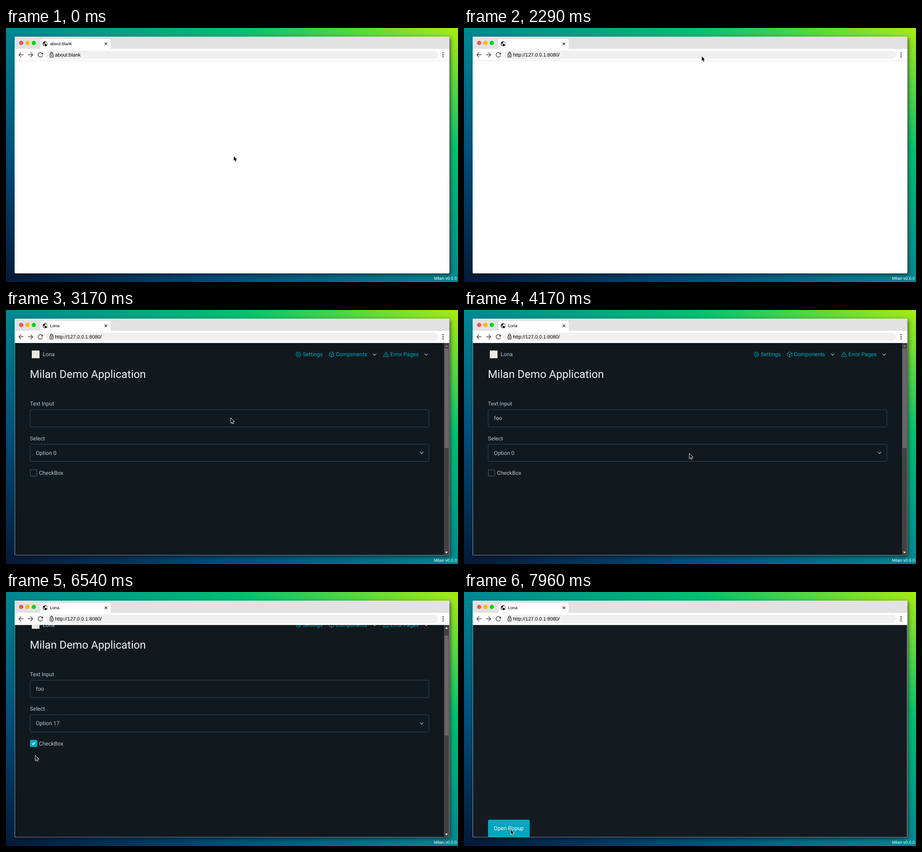
Write an HTML page that moves like this. It is 998x561 px and loops after 8000 ms.

```html
<!DOCTYPE html>
<html lang="en">
<head>
<meta charset="utf-8">
<title>Browser demo</title>
<style>
  html, body { margin: 0; width: 100%; height: 100%; overflow: hidden; }
  body {
    position: relative;
    background: linear-gradient(to right top, #051937, #004d7a, #008793, #00bf72, #a8eb12);
  }
  #window {
    position: absolute; left: 19px; top: 19px; width: 960px; height: 523px;
    border-radius: 2px; background: #fff;
    box-shadow: 2px 3px 9px rgba(0, 0, 0, .6);
  }
  svg { position: absolute; left: 0; top: 0; display: block; }
  text { white-space: pre; text-rendering: geometricPrecision; }
  .ui { font-family: "Liberation Sans", Arial, sans-serif; }
  .page { font: 12.1px Roboto, sans-serif; fill: #bbc6ce; }
  .link { fill: #00acc1; }
  .icon { fill: none; stroke: #00acc1; stroke-linecap: round; stroke-linejoin: round; }
  .chevron { fill: none; stroke: #a8b3bb; stroke-width: 1.3; stroke-linecap: round; stroke-linejoin: round; }
  .field { fill: #11191f; stroke: #374956; }
</style>
</head>
<body>
<div id="window"></div>
<svg width="998" height="561" viewBox="0 0 998 561">
  <defs>
    <clipPath id="view"><rect x="19.6" y="73" width="958.8" height="468.6"/></clipPath>
    <path id="chev" class="chevron" d="M-3.3-1.7 0 1.7 3.3-1.7"/>
    <path id="arrow" d="M8-1H-4.17L1.42-6.59 0-8-8 0 0 8 1.41 6.59-4.17 1H8z"/>
  </defs>

  <path d="M19 46V21q0-2 2-2H977q2 0 2 2V46z" fill="#e2e2e2"/>
  <path d="M76 46V27q0-3 3-3H228q3 0 3 3V46z" fill="#fff"/>
  <circle cx="33.4" cy="33" r="4.7" fill="#ee5a4e"/>
  <circle cx="47.4" cy="33" r="4.7" fill="#f3bc0a"/>
  <circle cx="61.4" cy="33" r="4.7" fill="#0ad416"/>
  <circle cx="86.5" cy="34.7" r="5.3"/>
  <path d="M82.2 33.4l2.8 2.6v1l1 1v1.2q-3.6-.8-3.8-5.800zM87.600 30.400q0 1.800-2 1.800v1.500h-1v1.200h3q1 0 1 1.400h1q.7 0 .9.800 3.200-4.600-2.900-6.700z" fill="#fff"/>
  <path d="M217.900 32.200l5.400 5.400m0-5.400l-5.400 5.400" stroke="#222" stroke-width="1.300"/>
  <text id="title" class="ui" x="97.200" y="38" font-size="9.360"></text>

  <rect x="88" y="50" width="866" height="18.500" rx="9.250" fill="#f0f0f0"/>
  <rect x="19" y="72" width="960" height="1" fill="#e2e2e2"/>
  <g fill="#4a4a4a">
    <use href="#arrow" transform="translate(33 59.200) scale(.71)"/>
    <use href="#arrow" transform="translate(54.500 59.200) scale(-.71 .71)"/>
    <path transform="translate(67.400 50.600) scale(.715)" d="M17.650 6.350C16.200 4.900 14.210 4 12 4c-4.420 0-7.990 3.580-7.990 8s3.570 8 7.990 8c3.730 0 6.840-2.550 7.730-6h-2.080c-.82 2.330-3.040 4-5.650 4-3.310 0-6-2.690-6-6s2.690-6 6-6c1.660 0 3.140.69 4.220 1.780L13 11h7V4l-2.350 2.350z"/>
    <circle cx="965" cy="54.700" r="1.450"/><circle cx="965" cy="59.200" r="1.450"/><circle cx="965" cy="63.700" r="1.450"/>
  </g>
  <g fill="none" stroke="#222" stroke-width="1.150">
    <rect x="97.100" y="57.200" width="7" height="6.900" rx=".8"/>
    <path d="M98.500 57V55.500a2.100 2.100 0 0 1 4.200 0V57"/>
  </g>
  <circle cx="100.600" cy="60.700" r="1.100"/>
  <text id="url" class="ui" x="108.300" y="63" font-size="10.920"></text>

  <g id="page" clip-path="url(#view)">
    <rect id="back" x="19" y="73" width="960" height="469"/>
    <g id="content" class="page">
      <rect x="57" y="89.500" width="17" height="17" fill="#ece8e0"/>
      <text x="81" y="102.200">Lona</text>
      <g id="bareNav" class="link">
        <text x="680.300" y="102.200">Settings</text>
        <text x="741" y="102.200">Components</text>
        <use href="#chev" x="826.300" y="98.300"/>
      </g>
      <text class="link" x="848.600" y="102.200">Error Pages</text>
      <use href="#chev" x="927.700" y="98.300"/>
      <g id="body">
        <g class="link">
          <text x="655.200" y="102.200">Settings</text>
          <text x="728.300" y="102.200">Components</text>
        </g>
        <use href="#chev" x="814" y="98.300"/>
        <g class="icon">
          <path id="gear"/>
          <circle cx="645.500" cy="98.200" r="1.800"/>
          <path d="M719 92.700l5 2.800v5.600l-5 2.800-5-2.800v-5.600zM714.200 95.600l4.800 2.700 4.800-2.700M719 98.300v5.400"/>
          <path d="M839 93l5.700 9.900h-11.400zM839 96.600v2.600M839 101v.2"/>
        </g>
        <text x="52.800" y="150.200" font-size="24.150" fill="#edf0f3">Milan Demo Application</text>
        <text x="52.800" y="211.400">Text Input</text>
        <rect class="field" x="53.300" y="220.200" width="880.400" height="38.200" rx="2.800"/>
        <text id="typed" x="66" y="243.400"></text>
        <text x="52.800" y="287.500">Select</text>
        <rect class="field" x="53.300" y="296.300" width="880.400" height="38.200" rx="2.800"/>
        <text id="option" x="66" y="319.600"></text>
        <use href="#chev" x="917.600" y="315.600"/>
        <rect class="field" x="53.700" y="352.700" width="14.200" height="14.200" rx="2.500" stroke-width="1.600"/>
        <g id="checked">
          <rect x="53" y="352" width="15.600" height="15.600" rx="3" fill="#00acc1"/>
          <path d="M57.600 360l2.200 2.200 4.300-4.500" fill="none" stroke="#fff" stroke-width="1.700"/>
        </g>
        <text x="72.800" y="364">CheckBox</text>
        <rect x="53" y="922.800" width="92" height="38.600" rx="3" fill="#00a6bd"/>
        <text x="66" y="946.200" fill="#fff">Open Popup</text>
      </g>
    </g>
    <g id="scrollbar">
      <rect x="967" y="73" width="12" height="469" fill="#424242"/>
      <rect id="thumb" x="968" width="9.200" fill="#686868"/>
      <path id="up" d="M969.400 81.300h6.400l-3.200-3.600z"/>
      <path d="M969.400 533.700h6.400l-3.200 3.600z" fill="#fff"/>
    </g>
  </g>

  <text class="ui" x="945" y="556.300" font-size="9.360" fill="#fff">Milan v0.0.0</text>
  <path id="cursor" d="M0 0V9.600L2.200 7.700 3.800 11.500 5.500 10.800 3.900 7.100 6.700 6.800z" fill="#000" stroke="#fff" stroke-width="1.700" paint-order="stroke"/>
</svg>
<script>
const LOOP = 8000, FPS = 24, SCROLL = 420;
const el = id => document.getElementById(id);
const clamp = x => Math.min(1, Math.max(0, x));
const show = (id, on) => el(id).setAttribute('display', on ? 'inline' : 'none');
const put = (id, text) => { if (el(id).textContent !== text) el(id).textContent = text; };
const wave = p => (1 - Math.cos(Math.PI * p)) / 2;

// Cursor moves: first tick, number of ticks, end point
const MOVES = [
  [24, 8, 525, 62.7],
  [63, 7, 498, 240.6],
  [93, 8, 498, 317.8],
  [124, 7, 68, 362],
  [136, 5, 65, 362],
  [181, 8, 103, 525]
];
const CLICKS = [38, 76, 107, 136];

// CSS "ease" curve
function ease(x) {
  const curve = (s, a, b) => 3 * s * (1 - s) ** 2 * a + 3 * s * s * (1 - s) * b + s ** 3;
  let lo = 0, hi = 1;
  for (let i = 0; i < 24; i++) {
    const mid = (lo + hi) / 2;
    if (curve(mid, .25, .25) < x) lo = mid; else hi = mid;
  }
  return curve(lo, .1, 1);
}

function cursorAt(tick) {
  let x = 503.2, y = 283.5;
  for (const [start, count, toX, toY] of MOVES) {
    if (tick < start) break;
    const p = ease(clamp((tick - start + 1) / count));
    x += (toX - x) * p;
    y += (toY - y) * p;
  }
  for (const start of CLICKS) {
    const dip = 2.6 * Math.sin(Math.PI * clamp((tick - start + 1) / 6));
    x -= dip;
    y -= dip;
  }
  return [x, y];
}

function gearPath() {
  let d = '';
  for (let i = 0; i < 32; i++) {
    const a = (i + .5) / 32 * 2 * Math.PI, r = i % 4 < 2 ? 5.6 : 4.4;
    d += (i ? 'L' : 'M') + (645.5 + r * Math.cos(a)).toFixed(2) + ' ' + (98.2 + r * Math.sin(a)).toFixed(2);
  }
  return d + 'z';
}

function draw(tick) {
  const loaded = tick >= 58, popup = tick >= 191;
  put('title', tick < 55 ? 'about:blank' : tick < 63 ? '' : 'Lona');
  put('url', tick < 50 ? 'about:blank' : 'http://127.0.0.1:8080/');
  put('typed', tick < 88 ? '' : 'foo');
  put('option', tick < 119 ? 'Option 0' : 'Option 17');

  show('page', tick >= 57);
  show('bareNav', !loaded);
  show('body', loaded);
  show('scrollbar', !popup);
  el('back').setAttribute('fill', popup ? '#131b20' : '#11191f');
  el('checked').setAttribute('opacity', clamp((tick - 141) / 6));

  const scroll = SCROLL * wave(clamp((tick - 154) / 19));
  el('content').setAttribute('transform', `translate(0 ${-scroll})`);
  el('thumb').setAttribute('y', 85 + scroll * .46);
  el('thumb').setAttribute('height', loaded ? 220 : 367);
  el('up').setAttribute('fill', scroll ? '#fff' : '#858585');
  el('cursor').setAttribute('transform', `translate(${cursorAt(tick)})`);
}

function run(now) {
  draw(Math.floor((now % LOOP) * FPS / 1000 + .12));
  requestAnimationFrame(t => run(Math.max(0, t - begin)));
}

el('gear').setAttribute('d', gearPath());
const begin = performance.now();
run(0);
</script>
</body>
</html>
```
